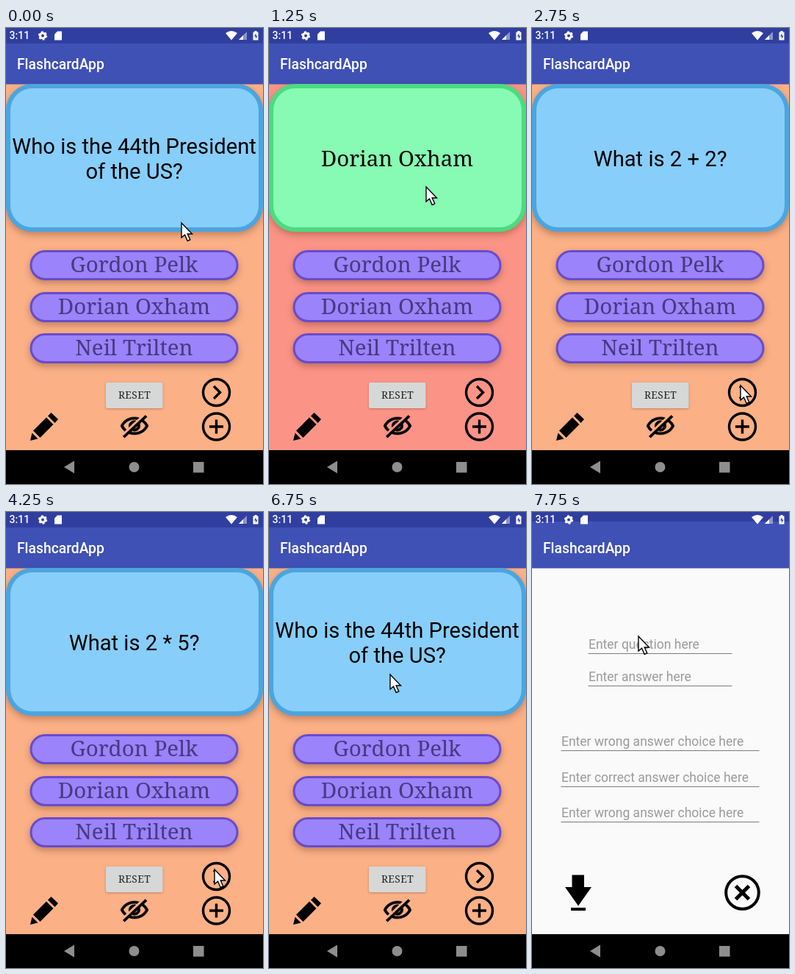
Animation of 350 by 620 pixels, one loop 8 s. Source, as an HTML page:

```html
<!DOCTYPE html>
<html lang="en">
<head>
<meta charset="utf-8">
<title>FlashcardApp</title>
<style>
  html, body { margin: 0; width: 100%; height: 100%; overflow: hidden; background: #000; }
  svg { display: block; }
  text { font-family: Roboto, sans-serif; }
  .serif { font-family: "Noto Serif", serif; }
  .mid { text-anchor: middle; }
  .line { fill: none; stroke: #000; }
  .choice rect { fill: #9a83fb; stroke: #694bcb; stroke-width: 3; }
  .choice text { font-size: 29.5px; fill: #473a80; }
  .raised { filter: drop-shadow(0 4px 5px rgba(60, 20, 0, .3)); }
  .low { filter: drop-shadow(0 1px 1.5px rgba(60, 20, 0, .3)); }
  #card { stroke-width: 6; }
  #question { font-size: 29.2px; }
  #answer { font-size: 29.5px; }
  .field text { font-size: 17.5px; fill: #9b9b9b; }
  .field path { stroke: #7c7c7c; }
</style>
</head>
<body>
<svg width="350" height="620" viewBox="0 0 350 620">
  <defs>
    <g id="appBar">
      <rect y="21" width="350" height="55.5" fill="#3f51b5"/>
      <text x="15" y="56.3" font-size="19.3" font-weight="500" fill="#fff">FlashcardApp</text>
    </g>
    <clipPath id="reveal"><rect id="revealBox" width="350" height="620"/></clipPath>
  </defs>

  <rect width="350" height="22" fill="#303f9f"/>
  <g id="home">
    <rect id="back" y="76" width="350" height="510"/>
    <use href="#appBar"/>
    <rect id="card" class="raised" x="3" y="79" width="344" height="195" rx="33"/>
    <text id="question" class="mid"></text>
    <text id="answer" class="serif mid" x="174.5" y="188">Dorian Oxham</text>
    <g id="choices"></g>
    <rect class="low" x="136" y="482" width="77.5" height="35" rx="2" fill="#d6d7d7"/>
    <text class="serif mid" x="175" y="504" font-size="13.8" letter-spacing=".4" fill="#222">RESET</text>
    <path d="M33 561 35.5 550.5 43.500 558.500ZM37 547.500 55 529.500 64.500 539 46.500 557ZM57 527.500 61.500 523 71 532 66.500 537Z"/>
    <path transform="translate(195.6 522.6) scale(-1.72 1.6)" stroke="#000" stroke-width=".35" d="M12 6c3.79 0 7.17 2.13 8.82 5.5-.59 1.22-1.42 2.27-2.41 3.12l1.41 1.41c1.39-1.23 2.49-2.77 3.18-4.53C21.27 7.11 17 4 12 4c-1.27 0-2.49.2-3.64.57l1.65 1.65C10.66 6.09 11.32 6 12 6zm-1.07 1.14L13 9.21c.57.25 1.03.71 1.28 1.28l2.07 2.07c.08-.34.14-.7.14-1.07C16.5 9.01 14.48 7 12 7c-.37 0-.72.05-1.07.14zM2.01 3.87l2.68 2.68C3.06 7.83 1.77 9.53 1 11.5 2.73 15.89 7 19 12 19c1.52 0 2.98-.29 4.32-.82l3.42 3.42 1.41-1.41L3.42 2.45zm7.5 7.5l2.61 2.61c-1.5.1-2.62-1.1-2.61-2.61zm-3.4-3.4l1.75 1.75c-.23.55-.36 1.15-.36 1.78 0 2.48 2.02 4.5 4.5 4.5.63 0 1.23-.13 1.77-.36l.98.98c-.88.24-1.8.38-2.75.38-3.79 0-7.17-2.13-8.82-5.5.7-1.43 1.72-2.61 2.93-3.53z"/>
    <g class="line" stroke-width="3.4">
      <circle cx="286.5" cy="495.5" r="18"/>
      <path d="M283 487l8.5 8.5-8.5 8.5"/>
      <circle cx="286.5" cy="542" r="18"/>
      <path d="M277 542h19M286.5 532.5v19"/>
    </g>
  </g>
  <rect id="dim" width="350" height="574" opacity=".07"/>

  <rect y="574" width="350" height="46"/>
  <g fill="#8e8e8e">
    <path d="M79 597l14-8.5v17z"/>
    <circle cx="174.5" cy="597" r="7"/>
    <rect x="255" y="590" width="14.5" height="14.5"/>
  </g>

  <g clip-path="url(#reveal)">
    <g id="form">
      <rect y="76" width="350" height="498" fill="#fafafa"/>
      <use href="#appBar"/>
      <g id="fields"></g>
      <path d="M54.5 493.5h16.5V510h10L63 535.5 45 510h9.5zM53 538h20v4H53z"/>
      <g class="line">
        <circle cx="286.5" cy="517.5" r="22.3" stroke-width="4"/>
        <path d="M277.5 508.5l18 18m0-18l-18 18" stroke-width="5"/>
      </g>
    </g>
  </g>

  <g fill="#fff">
    <text x="4.5" y="15.3" font-size="14" font-weight="500">3:11</text>
    <g fill="none" stroke="#fff">
      <circle cx="50" cy="10.5" r="3.5" stroke-width="3"/>
      <circle cx="50" cy="10.5" r="5.3" stroke-width="1.7" stroke-dasharray="2.8 2.75"/>
    </g>
    <path d="M70 4.5h6v12H66V8.5z"/>
    <path d="M299 7q8-6 16 0l-8 9.5z"/>
    <path d="M317 16L328 5v11z" opacity=".45"/>
    <path d="M317 16l6-6v6z"/>
    <path d="M336.5 5.5h2V4h3v1.5h2v11h-7z"/>
    <path d="M340.5 7l-2.5 4.5h2V15l2.5-4.5h-2z" fill="#303f9f"/>
  </g>
  <path id="cursor" d="M0 0V20L4.5 16.2 8.2 24.5 11.8 23 8.2 15H14.5Z" fill="#fff" stroke="#000" stroke-width="1.4"/>
</svg>
<script>
const $ = id => document.getElementById(id);
const LOOP = 8000;

$('choices').innerHTML = [['Gordon Pelk', 303.5], ['Dorian Oxham', 360.5], ['Neil Trilten', 416.5]]
  .map(([name, y]) => `<g class="choice"><rect class="raised" x="34" y="${y}" width="281" height="38" rx="19"/>
    <text class="serif mid" x="174.5" y="${y + 28}">${name}</text></g>`).join('');

const wrong = 'wrong answer choice';
$('fields').innerHTML = [
  ['question', 77, 192.5], ['answer', 77, 236.5],
  [wrong, 40, 324.5], ['correct answer choice', 40, 373.5], [wrong, 40, 421.5]
].map(([label, x, y]) => `<g class="field"><text x="${x}" y="${y - 7}">Enter ${label} here</text>
    <path d="M${x - .5} ${y}H${349.5 - x}"/></g>`).join('');

const president = ['Who is the 44th President', 'of the US?'];

// Each track lists [start time, value]; values hold until the next entry.
const pointer = [
  [0, [239, 265]], [250, [222, 240]], [500, [217, 208]], [750, [214, 216]],
  [1750, [277, 368]], [2000, [326, 514]], [2250, [279, 494]], [2500, [284, 486]],
  [5500, [285, 508]], [5750, [295, 537]], [6750, [165, 221]], [7000, [165, 205]],
  [7250, [151, 183]], [7500, [140, 168]], [7750, [145, 169]]
];
const questions = [
  [0, president], [2750, ['What is 2 + 2?']], [4250, ['What is 2 * 5?']], [5000, president]
];
const flipped = [[0, false], [1250, true], [1500, false]];
// top edge of the reveal, form offset, home offset
const opening = [[0, null], [7000, [351, 23.5, -1]], [7250, [60, 4, -6]], [7500, [0, 0, -8]]];

const at = (track, t) => track.findLast(([start]) => start <= t)[1];
const shift = (id, x, y) => $(id).setAttribute('transform', `translate(${x} ${y})`);
const show = (id, on) => $(id).style.display = on ? '' : 'none';

function draw(t) {
  shift('cursor', ...at(pointer, t));

  const back = at(flipped, t);
  $('back').setAttribute('fill', back ? '#fb9487' : '#fbb086');
  $('card').setAttribute('fill', back ? '#87fab3' : '#87cefa');
  $('card').setAttribute('stroke', back ? '#4bdb82' : '#4ba5df');
  show('answer', back);
  show('question', !back);

  const lines = at(questions, t);
  const first = lines.length > 1 ? 171 : 188;
  $('question').innerHTML = lines
    .map((s, i) => `<tspan x="174.6" y="${first + i * 34}">${s}</tspan>`).join('');

  const open = at(opening, t);
  const [top, formY, homeY] = open || [0, 0, 0];
  show('form', open);
  show('dim', open && top > 0);
  $('revealBox').setAttribute('y', top);
  shift('form', 0, formY);
  shift('home', 0, homeY);
}

const begin = performance.now();
function tick() {
  draw((performance.now() - begin) % LOOP);
  requestAnimationFrame(tick);
}
tick();
</script>
</body>
</html>
```
